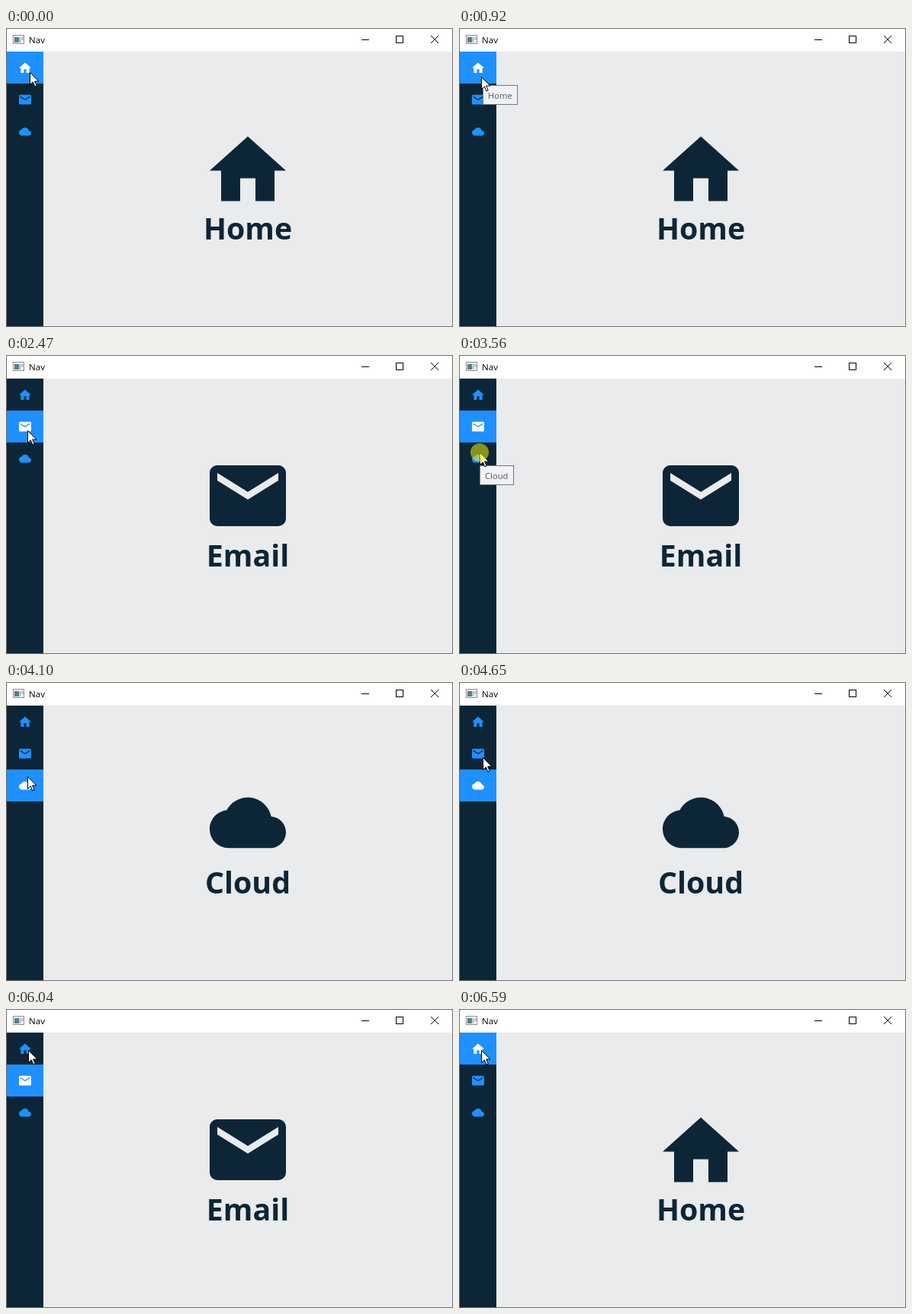
Recreate the animation shown at these times as an HTML page. Size 586 by 393 pixels, loop 6900 ms.

```html
<!DOCTYPE html>
<html lang="en">
<head>
<meta charset="utf-8">
<title>Nav</title>
<style>
  html, body { margin: 0; width: 100%; height: 100%; overflow: hidden; background: #fff; }
  svg { display: block; width: 586px; height: 393px; }
  text { font-family: "Open Sans", "Noto Sans", sans-serif; }
  .dark { fill: #0d2637; }
  .caption { font-size: 39.3px; font-weight: 700; text-anchor: middle; }
  .title { font-size: 11.6px; }
  .tip rect { fill: #f1f2f7; stroke: #767676; }
  .tip text { font-size: 11.2px; fill: #575757; }
  .controls { fill: none; stroke: #000; }
</style>
</head>
<body>
<svg viewBox="0 0 586 393">
  <defs>
    <path id="Home" transform="translate(-60 -57.5) scale(5)"
      d="M10 20v-6h4v6h5v-8h3L12 3 2 12h3v8z"/>
    <path id="Email" transform="translate(-60 -60) scale(5)"
      d="M20 8l-8 5-8-5V6l8 5 8-5m0-2H4c-1.1 0-2 .9-2 2v12a2 2 0 0 0 2 2h16a2 2 0 0 0 2-2V6c0-1.1-.9-2-2-2z"/>
    <path id="Cloud" transform="translate(-50 -50) scale(4.1667)"
      d="M19.35 10.04C18.67 6.59 15.64 4 12 4 9.11 4 6.6 5.64 5.35 8.04 2.34 8.36 0 10.91 0 14c0 3.31 2.69 6 6 6h13c2.76 0 5-2.24 5-5 0-2.64-2.05-4.78-4.65-4.96z"/>
  </defs>

  <rect width="586" height="393" fill="#fff"/>
  <rect x="1" y="31" width="584" height="361" fill="#e9ebec"/>
  <rect class="dark" x="1" y="31" width="48" height="361"/>

  <g>
    <rect x="9.5" y="9.5" width="14" height="11" fill="#f4f4f4" stroke="#8c8c8c"/>
    <rect x="11" y="12" width="6" height="7" fill="#4d8390"/>
    <path d="M18.5 12v7M21.5 12v4" stroke="#b5b5b5" stroke-width="2"/>
  </g>
  <text class="title" x="30" y="20">Nav</text>
  <g class="controls">
    <path d="M466 15.5h10"/>
    <rect x="511.5" y="10.5" width="9" height="9"/>
    <path d="M557 10l10 10M567 10l-10 10"/>
  </g>

  <rect id="selection" x="1" width="48" height="42" fill="#1e90ff"/>
  <g id="tabs"></g>
  <use id="picture" class="dark" transform="translate(317 185)"/>
  <text id="caption" class="dark caption" x="317" y="278"></text>
  <rect x=".5" y=".5" width="585" height="392" fill="none" stroke="#707070"/>

  <g id="tips"></g>
  <g id="cursor">
    <path d="M.5.5v16l3.8-3.6 2.6 6 2.3-1-2.6-5.9h5.3z" fill="#fff" stroke="#000"/>
  </g>
  <circle id="click" r="12" fill="#ff0" fill-opacity=".5"/>
</svg>

<script>
const LOOP = 6900, STEP = 77;
const pages = ["Home", "Email", "Cloud"];
const byId = id => document.getElementById(id);

// Cursor moves in discrete steps; power shapes the pace, bow bends the path sideways.
const moves = [
  { start: 840, end: 1460, steps: 9, from: [31, 58], to: [30, 85], bow: -2 },
  { start: 1540, end: 1540, steps: 1, from: [30, 85], to: [30, 88] },
  { start: 2240, end: 2850, steps: 9, from: [30, 88], to: [28, 120], power: 1.3, bow: -1 },
  { start: 2940, end: 3080, steps: 3, from: [28, 120], to: [27, 128] },
  { start: 4100, end: 4730, steps: 9, from: [27, 128], to: [32, 95] },
  { start: 4810, end: 4810, steps: 1, from: [32, 95], to: [31, 94] },
  { start: 5500, end: 6040, steps: 8, from: [31, 94], to: [29, 54], bow: 6 }
];

const clicks = [
  { time: 1690, page: 1, shown: 1765 },
  { time: 3560, page: 2, shown: 3635 },
  { time: 5110, page: 1, shown: 5110 },
  { time: 6440, page: 0, shown: 6515 }
];

const tips = [
  { text: "Home", width: 46, x: 31, y: 75, open: 300, close: 1075 },
  { text: "Email", width: 42, x: 30, y: 89, open: 1150, close: 1765 },
  { text: "Cloud", width: 45, x: 27, y: 145, open: 3240, close: 3635 },
  { text: "Email", width: 42, x: 31, y: 112, open: 4890, close: 5110 },
  { text: "Home", width: 46, x: 29, y: 71, open: 6210, close: 6515 }
];

byId("tabs").innerHTML = pages.map((name, i) =>
  `<use href="#${name}" transform="translate(25 ${52.2 + 42 * i}) scale(.16)"/>`).join("");
byId("tips").innerHTML = tips.map(({ text, width, x, y }) =>
  `<g class="tip" transform="translate(${x} ${y})">
    <rect x=".5" y=".5" width="${width - 1}" height="25"/><text x="7" y="18">${text}</text>
  </g>`).join("");

const tabIcons = [...byId("tabs").children];
const tipBoxes = [...byId("tips").children];
const lerp = (a, b, p) => a + (b - a) * p;

function cursorAt(t) {
  const move = moves.findLast(m => t >= m.start);
  if (!move) return moves[0].from;
  const { start, end, steps, from, to, power = 1, bow = 0 } = move;
  const pace = steps > 1 ? (end - start) / (steps - 1) : STEP;
  const done = Math.min(steps, Math.floor((t - start + 4) / pace) + 1);
  const p = (done / steps) ** power;
  const x = lerp(from[0], to[0], p) + bow * Math.sin(Math.PI * p);
  return [Math.round(x), Math.round(lerp(from[1], to[1], p))];
}

function tipOpacity({ open, close }, t) {
  if (t < open || t >= close + STEP - 2) return 0;
  if (t >= close) return 0.7;
  return t < open + STEP - 2 ? 0.5 : 1;
}

function showPage(index) {
  const name = pages[index];
  byId("selection").setAttribute("y", 31 + 42 * index);
  byId("picture").setAttribute("href", "#" + name);
  byId("caption").textContent = name;
  tabIcons.forEach((icon, i) => icon.setAttribute("fill", i === index ? "#fff" : "#1e90ff"));
}

let current = -1;
function draw() {
  const t = performance.now() % LOOP;
  const page = clicks.findLast(c => t >= c.shown)?.page ?? 0;
  if (page !== current) showPage(current = page);

  const place = `translate(${cursorAt(t).join(" ")})`;
  byId("cursor").setAttribute("transform", place);
  byId("click").setAttribute("transform", place);
  const pressed = clicks.some(c => t >= c.time && t < c.time + 150);
  byId("click").setAttribute("visibility", pressed ? "visible" : "hidden");

  tipBoxes.forEach((box, i) => box.setAttribute("opacity", tipOpacity(tips[i], t)));
  requestAnimationFrame(draw);
}
draw();
</script>
</body>
</html>
```
